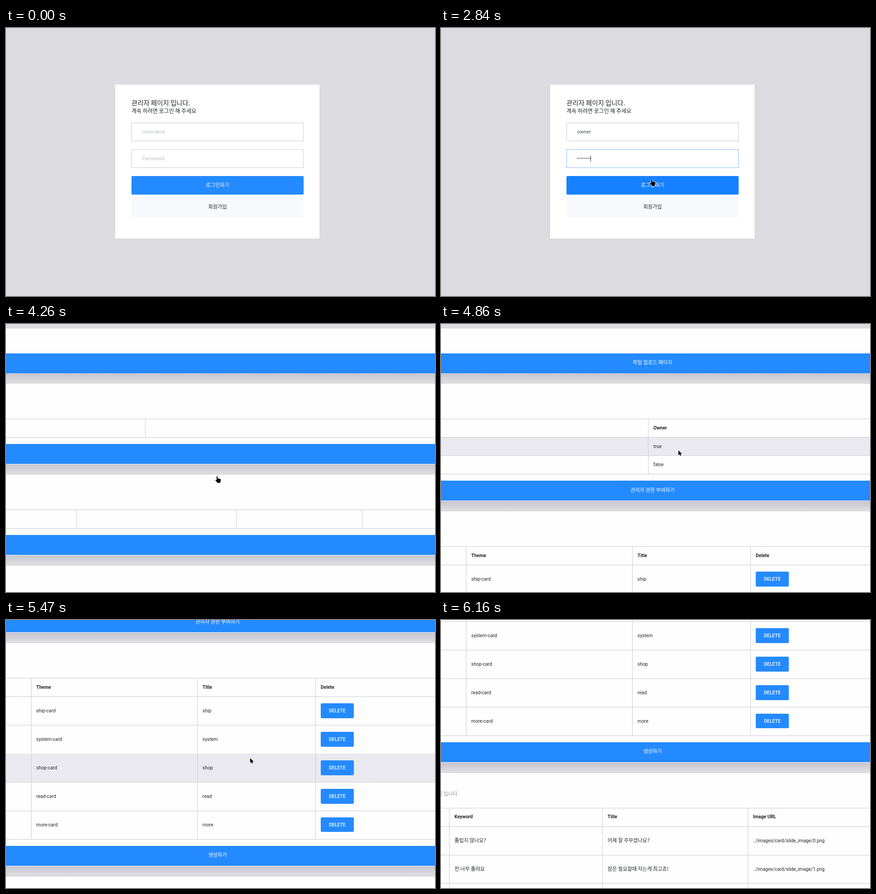
Animation, 947 px wide and 592 px high, one loop 6470 ms. Source, as an HTML page with a canvas:

```html
<!DOCTYPE html>
<html lang="ko">
<head>
<meta charset="utf-8">
<style>
html, body { margin: 0; width: 100%; height: 100%; overflow: hidden; background: #dcdbe0; }
canvas { display: block; }
</style>
</head>
<body>
<canvas id="stage" width="947" height="592"></canvas>
<script>
const ctx = document.getElementById('stage').getContext('2d');
const LOOP = 6470, W = 947, H = 592;
const BLUE = '#248aff', BLUE_HOVER = '#1581ff', LINE = '#c9c9d6', BG = '#dcdbe0', INK = '#212529';
const KO = '"Noto Sans CJK KR", "Noto Sans KR", sans-serif';
const LATIN = 'Roboto, ' + KO;

// Stretches of motion: first step, last step, number of steps
const MOVES = [[70, 670, 9], [2530, 2920, 6], [4710, 5310, 9], [5390, 6000, 9]];
const USER_KEYS = [1050, 1140, 1290, 1370, 1540];
const PASS_KEYS = [2070, 2150, 2230, 2380, 2530, 2600, 2680, 2760];

// Time, x, y
const POINTER = [[70, 818, 552], [220, 700, 452], [370, 590, 359], [520, 490, 274], [670, 452, 243],
  [2370, 452, 243], [2380, 451, 244], [2530, 452, 262], [2608, 455, 290], [2686, 460, 322], [2760, 464, 334],
  [3060, 464, 334], [3070, 465, 336], [4635, 465, 336], [4710, 486, 316], [4860, 524, 279],
  [5235, 536, 293], [5466, 539, 305], [5695, 542, 330], [6000, 550, 574]];
const SCROLL = [[4860, 0], [4935, 20], [5010, 75], [5235, 221], [5310, 268], [5390, 310],
  [5466, 363], [5695, 508], [5850, 574], [6000, 592]];

const TABLES = [
  { cols: [457], early: [307], head: ['Owner'], rowH: 40.7, button: '관리자 권한 부여하기',
    rows: [['true'], ['false']] },
  { cols: [55, 422, 683], early: [155, 508, 786], head: ['Theme', 'Title', 'Delete'], rowH: 62.9, button: '생성하기',
    rows: ['ship', 'system', 'shop', 'read', 'more'].map(n => [n + '-card', n, 'DELETE']) },
  { cols: [18, 356, 677], early: [18, 356, 677], head: ['Keyword', 'Title', 'Image URL'], rowH: 62.9, button: '',
    note: '목록 입니다.',
    rows: [['졸립지 않나요?', '어제 잘 주무셨나요?', '../images/card/slide_image/0.png'],
      ['전 너무 졸려요', '잠은 필요할때 자는게 최고죠!', '../images/card/slide_image/1.png'], ['', '', '']] }
];

const clamp = v => Math.max(0, Math.min(1, v));
const typed = (keys, t) => keys.filter(k => t >= k).length;

function snap(t) {
  for (const [a, b, n] of MOVES) {
    const step = (b - a) / (n - 1);
    if (t >= a && t < b + step) return a + Math.min(n - 1, Math.floor((t - a) / step)) * step;
  }
  return t;
}

function track(keys, t) {
  const i = keys.findIndex(k => k[0] > t);
  if (i < 0) return keys[keys.length - 1].slice(1);
  if (i === 0) return keys[0].slice(1);
  const a = keys[i - 1], b = keys[i], p = (t - a[0]) / (b[0] - a[0]);
  return a.slice(1).map((v, j) => v + (b[j + 1] - v) * p);
}

function rect(x, y, w, h, color, radius = 0) {
  const top = Math.round(y);
  ctx.fillStyle = color;
  ctx.beginPath();
  ctx.roundRect(x, top, w, Math.round(y + h) - top, radius);
  ctx.fill();
}

function text(s, x, y, font, color, align = 'left') {
  ctx.font = font;
  ctx.fillStyle = color;
  ctx.textAlign = align;
  ctx.fillText(s, x, y);
}

function cellText(s, x, y, weight = 400) {
  const korean = /[가-힣]/.test(s);
  text(s, x, y, korean ? `${weight} 11.2px ${KO}` : `${weight} 10.4px ${LATIN}`, INK);
}

function field(y, value, hint, focus, caret) {
  ctx.lineWidth = 1;
  for (const [color, alpha] of [[LINE, 1], ['#80bdff', focus]]) {
    ctx.globalAlpha = alpha;
    ctx.strokeStyle = color;
    ctx.strokeRect(277.5, y + .5, 379, 40);
  }
  ctx.globalAlpha = 1;
  const font = '11.2px ' + LATIN;
  text(value || hint, 300.3, y + 24, font, value ? '#495057' : '#bcc0c4');
  if (caret) rect(Math.floor(300.3 + (value ? ctx.measureText(value).width : 0)), y + 14, 1, 13, '#333');
}

function inside(p, y, h) {
  return p && p[0] >= 277 && p[0] < 657 && p[1] >= y && p[1] < y + h;
}

function drawLogin(t, p) {
  rect(241, 125, 451, 340, '#fff');
  text('관리자 페이지 입니다.', 277, 171, '14.4px ' + KO, INK);
  text('계속 하려면 로그인 해 주세요', 277, 188.3, '12px ' + KO, INK);

  const toPass = clamp((t - 1640) / 200);
  field(209, 'owner'.slice(0, typed(USER_KEYS, t)), 'Username', clamp((t - 700) / 130) * (1 - toPass), t >= 750 && t < 1690);
  field(268, '•'.repeat(typed(PASS_KEYS, t)), 'Password', toPass, t >= 1690 && !(t >= 3300 && t < 3850));

  const onLogin = inside(p, 327, 41), onJoin = inside(p, 373, 45);
  rect(277, 327, 380, 41, onLogin ? BLUE_HOVER : BLUE, 2.5);
  text('로그인하기', 467, 350.6, '11.2px ' + KO, '#fff', 'center');
  rect(277, 373, 380, 45, onJoin ? '#e9ecf3' : '#f8f9fc', 2.5);
  text('회원가입', 467, 398.6, '11.2px ' + KO, INK, 'center');

  if (onLogin || onJoin) return 'hand';
  return inside(p, 209, 41) || inside(p, 268, 41) ? 'beam' : 'arrow';
}

function cardEnd(y, label, ready) {
  rect(0, y, W, 44, BLUE);
  if (ready) text(label, 467, y + 24.4, '11.2px ' + KO, '#fff', 'center');
  const shade = ctx.createLinearGradient(0, y + 45, 0, y + 63);
  shade.addColorStop(0, '#c6c4ce');
  shade.addColorStop(1, BG);
  rect(0, y + 45, W, 23, shade);
}

function drawTable(table, top, t, pointerY) {
  const ready = t >= 4320, loaded = t >= 4400;
  const cols = loaded ? table.cols : table.early;
  const rows = loaded ? table.rows : [];
  const y = top + 77, body = y + 40.7, bottom = body + rows.length * table.rowH;
  rect(0, top, W, bottom + 60.3 - top, '#fefefe');
  if (table.note && ready) text(table.note, 39.5, top + 50.5, '11.2px ' + KO, '#87938f', 'right');

  rows.forEach((row, i) => {
    const ry = body + i * table.rowH, mid = ry + table.rowH / 2;
    if (pointerY >= ry && pointerY < ry + table.rowH) {
      ctx.globalAlpha = t < 6080 ? 1 : .4;
      rect(0, ry, W, table.rowH, '#e9e9ef');
      ctx.globalAlpha = 1;
    }
    row.forEach((s, j) => {
      const x = cols[j] + 11.8;
      if (s === 'DELETE') {
        rect(x, ry + 15.2, 73, 32.5, BLUE, 2.4);
        text(s, x + 36.5, mid + 3.6, '500 10.4px ' + LATIN, '#fff', 'center');
      } else cellText(s, x, mid + 3.6);
    });
    rect(0, ry + table.rowH, W, 1, LINE);
  });

  rect(0, y, W, 1, LINE);
  rect(0, body, W, 1, LINE);
  cols.forEach((x, j) => {
    rect(x, y, 1, bottom - y, LINE);
    if (ready) cellText(table.head[j], x + 11.8, y + 23.5, 700);
  });
  cardEnd(bottom + 15.3, table.button, ready);
  return bottom + 83.3;
}

function drawPage(t, p) {
  const scroll = Math.round(track(SCROLL, t)[0]);
  const pointerY = p ? p[1] + scroll : -1;
  ctx.save();
  ctx.translate(0, -scroll);
  rect(0, 10, W, 99, '#fefefe');
  cardEnd(64.5, '파일 업로드 페이지', t >= 4320);
  let top = 132;
  for (const table of TABLES) top = drawTable(table, top, t, pointerY);
  if (top < H) rect(0, top, W, H - top, '#fefefe');
  ctx.restore();
  return t < 4710 ? 'hand' : 'arrow';
}

const SHAPES = {
  arrow: new Path2D('M0 0V11L2.6 8.7L4.4 12.4L6.2 11.6L4.5 8H8Z'),
  hand: new Path2D('M0 1Q1-.8 2 1V5L8 6.3Q9.2 6.8 9 8.2L8.5 11.5L7.5 15H2L-2.4 9.8Q-3.2 8 -1.6 8L0 9.2Z'),
  beam: new Path2D('M-3-8.5H-1L0-8L1-8.5H3M0-8V8M-3 8.5H-1L0 8L1 8.5H3')
};

function drawPointer([x, y], kind) {
  ctx.save();
  ctx.translate(Math.round(x), Math.round(y));
  ctx.lineJoin = 'round';
  if (kind === 'beam') {
    ctx.translate(.5, 0);
    ctx.strokeStyle = '#000';
    ctx.lineWidth = 1;
    ctx.stroke(SHAPES.beam);
  } else {
    ctx.strokeStyle = '#fff';
    ctx.lineWidth = 1.4;
    ctx.stroke(SHAPES[kind]);
    ctx.fillStyle = '#000';
    ctx.fill(SHAPES[kind]);
  }
  ctx.restore();
}

function frame() {
  const t = snap(performance.now() % LOOP);
  const pointer = t >= 70 && t < 6160 ? track(POINTER, t) : null;
  rect(0, 0, W, H, BG);
  const kind = (t < 4020 ? drawLogin : drawPage)(t, pointer);
  if (pointer && t < 6080) drawPointer(pointer, kind);
  requestAnimationFrame(frame);
}
frame();
</script>
</body>
</html>
```
